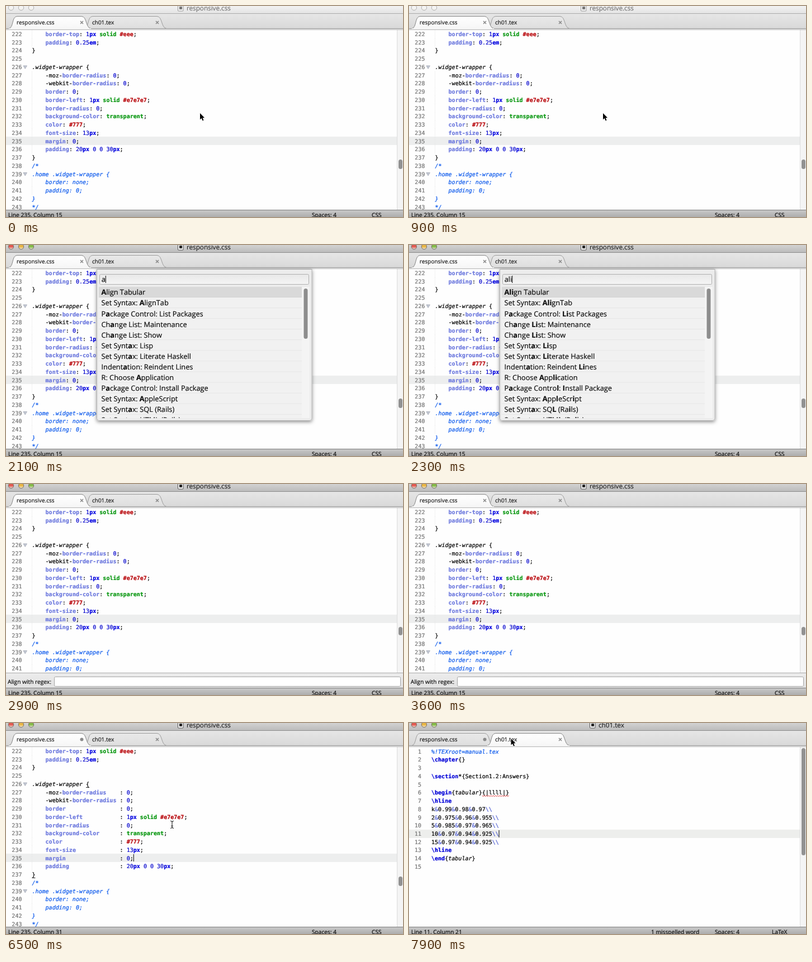
Recreate the animation shown at these times as an HTML page with a canvas. Size 710 by 378 pixels, loop 8000 ms.

```html
<!DOCTYPE html>
<html lang="en">
<head>
<meta charset="utf-8">
<title>Aligning code in an editor</title>
<style>
html, body { margin: 0; width: 100%; height: 100%; overflow: hidden; }
canvas { display: block; width: 710px; height: 378px; }
</style>
</head>
<body>
<canvas></canvas>
<script>
const W = 710, H = 378, LOOP = 8000;
const CW = 6.045, LH = 14.74, LEFT = 46.4;            // code cell and margin
const T = { focus: 1400, palette: 1900, panel: 2900, regex: 4100, align: 4700, mouse: 5600, tab: 7500 };

const canvas = document.querySelector('canvas');
const ctx = canvas.getContext('2d');
const dpr = window.devicePixelRatio || 1;
canvas.width = W * dpr;
canvas.height = H * dpr;
ctx.scale(dpr, dpr);
ctx.textRendering = 'geometricPrecision';

const css = `    border-top: 1px solid #eee;
    padding: 0.25em;
}

.widget-wrapper {
    -moz-border-radius: 0;
    -webkit-border-radius: 0;
    border: 0;
    border-left: 1px solid #e7e7e7;
    border-radius: 0;
    background-color: transparent;
    color: #777;
    font-size: 13px;
    margin: 0;
    padding: 20px 0 0 30px;
}
/*
.home .widget-wrapper {
    border: none;
    padding: 0;
}
*/`.split('\n');

const aligned = css.map((line, i) => {
  if (i < 5 || i > 14) return line;
  const [name, value] = line.split(':');
  return name.padEnd(26) + ':' + value;
});

const tex = String.raw`%!TEXroot=manual.tex
\chapter{}

\section*{Section1.2:Answers}

\begin{tabular}{|llll|}
\hline
k&0.99&0.98&0.97\\
2&0.975&0.96&0.955\\
5&0.985&0.97&0.965\\
10&0.97&0.94&0.925\\
15&0.97&0.94&0.925\\
\hline
\end{tabular}
`.split('\n');

// Letters between stars match the query.
const commands = `*Ali*gn Tabular
Set Syntax: *Ali*gnTab
P*a*ckage Control: *Li*st Packages
Ch*a*nge *Li*st: Maintenance
Ch*a*nge *Li*st: Show
Set Synt*a*x: *Li*sp
Set Synt*a*x: *Li*terate Haskell
Indent*a*tion: Reindent *Li*nes
R: Choose *A*pp*li*cation
P*a*ckage Contro*l*: *I*nstall Package
Set Syntax: *A*pp*l*eScr*i*pt
Set Synt*a*x: SQ*L* (Ra*i*ls)
Set Synt*a*x: HTM*L* (Ra*i*ls)`.split('\n');

const STYLE = {
  plain: ['', '#000'], comment: ['italic', '#0a58ec'], selector: ['italic', '#000'],
  prop: ['bold', '#6d79de'], unit: ['bold', '#0000e0'], num: ['', '#0000cd'],
  word: ['bold', '#06960e'], hex: ['bold', '#b8060b'], key: ['bold', '#0000d8'], op: ['', '#4a5ad0']
};

const CSS_RULES = [
  ['plain', /^(\s+|-(moz|webkit)-|[:;{}])/], ['selector', /^\.[\w-]+/], ['hex', /^#\w+/],
  ['num', /^[\d.]+/], ['unit', /^(px|em)/], ['word', /^(solid|transparent)/], ['prop', /^[\w-]+/]
];
const TEX_RULES = [
  ['comment', /^%.*/], ['key', /^\\[a-z]+/], ['op', /^(&|\\\\)/],
  ['selector', /^tabular/], ['plain', /^([^&\\t]+|t)/]
];

function rect(x, y, w, h, fill) {
  ctx.fillStyle = fill;
  ctx.fillRect(x, y, w, h);
}

function box(x, y, w, h, r, fill, stroke) {
  ctx.beginPath();
  ctx.roundRect(x, y, w, h, r);
  ctx.fillStyle = fill;
  ctx.fill();
  if (stroke) {
    ctx.strokeStyle = stroke;
    ctx.lineWidth = 1;
    ctx.stroke();
  }
}

function dot(x, y, r, fill, stroke) {
  box(x - r, y - r, 2 * r, 2 * r, r, fill, stroke);
}

function fade(y0, y1, ...colors) {
  const g = ctx.createLinearGradient(0, y0, 0, y1);
  colors.forEach((c, i) => g.addColorStop(i / (colors.length - 1), c));
  return g;
}

// A hairline stroke gives the slightly heavy desktop text rendering.
function ink(str, x, y, color) {
  ctx.fillStyle = ctx.strokeStyle = color;
  ctx.lineWidth = .22;
  ctx.fillText(str, x, y);
  ctx.strokeText(str, x, y);
}

function label(str, x, y, size, color = '#111', weight = '') {
  ctx.font = `${weight} ${size}px "Open Sans", "Noto Sans", sans-serif`;
  ink(str, x, y, color);
  return ctx.measureText(str).width;
}

function mono(str, x, y, style) {
  const [face, color] = STYLE[style] || ['', style];
  ctx.font = `${face} 10.04px "DejaVu Sans Mono", "Noto Sans Mono", monospace`;
  ink(str, x, y, color);
}

function code(line, x, y, rules) {
  let rest = line, col = 0;
  while (rest) {
    let style = 'plain', part = rest[0];
    for (const [name, rule] of rules) {
      const m = rest.match(rule);
      if (m) { style = name; part = m[0]; break; }
    }
    mono(part, x + col * CW, y, style);
    col += part.length;
    rest = rest.slice(part.length);
  }
}

function tab(x, name, active, dirty) {
  ctx.beginPath();
  ctx.moveTo(x, 40.5);
  ctx.bezierCurveTo(x + 9, 39, x + 5, 18.5, x + 15, 18.5);
  ctx.lineTo(x + 130, 18.5);
  ctx.bezierCurveTo(x + 140, 18.5, x + 137, 39, x + 147, 40.5);
  ctx.fillStyle = active ? fade(18, 41, '#ffffff', '#f6f6f6') : fade(18, 41, '#e9e9e9', '#dedede');
  ctx.fill();
  ctx.strokeStyle = active ? '#858585' : '#9c9c9c';
  ctx.lineWidth = 1;
  ctx.stroke();
  label(name, x + 14, 33, 10, '#222');
  const cx = x + 130.5, cy = 29.5;
  if (dirty) return dot(cx, cy, 3, '#8b8b8b');
  ctx.beginPath();
  for (const s of [-1, 1]) {
    ctx.moveTo(cx - 2.5, cy - 2.5 * s);
    ctx.lineTo(cx + 2.5, cy + 2.5 * s);
  }
  ctx.strokeStyle = '#8a8a8a';
  ctx.lineWidth = 1.6;
  ctx.stroke();
}

function chrome(t, inTex) {
  const focused = t >= T.focus;
  rect(0, 0, W, 14, focused ? fade(0, 13, '#d2d2d2', '#bcbcbc') : fade(0, 13, '#f2f2f2', '#e4e4e4'));
  rect(0, 13, W, 1, focused ? '#8c8c8c' : '#aaaaaa');
  rect(0, 14, W, 27, fade(14, 41, '#e6e6e6', '#d8d8d8'));

  const lights = focused ? ['#e2574e', '#e8b440', '#82b944'] : ['#f4f4f4', '#f4f4f4', '#f4f4f4'];
  lights.forEach((c, i) => dot(9 + 18 * i, 3, 4.7, fade(-2, 8, c, c, '#f3efe6'), focused ? '#77706a' : '#b0b0b0'));

  const x = inTex ? 323 : 307;
  const color = focused ? '#262626' : '#777';
  box(x + .5, -3, 9.5, 12, 1, '#f4f4f4', focused ? '#555' : '#999');
  rect(x + 3, 1, 5, 5, color);
  label(inTex ? 'ch01.tex' : 'responsive.css', x + 16, 7.5, 11.7, color);

  const dirty = t >= T.align;
  const tabs = [[5, 'responsive.css', !inTex, dirty], [140, 'ch01.tex', inTex, false]];
  tabs.sort((a, b) => a[2] - b[2]).forEach(a => tab(...a));
  const open = inTex ? 140 : 5;
  rect(0, 40, W, 3, '#f4f4f4');
  rect(0, 40, open, 1, '#8f8f8f');
  rect(open + 147, 40, W, 1, '#8f8f8f');
  rect(0, 42, W, 1, '#b5b5b5');
}

function status(left, spell, lang, x) {
  rect(0, 365, W, 13, fade(365, 378, '#cacaca', '#adadad'));
  rect(0, 365, W, 1, '#7d7d7d');
  label(left, 4, 378, 10.2);
  if (spell) label(spell, 433, 378, 10.2);
  label('Spaces: 4', 547, 378, 10.2);
  label(lang, x, 378, 10.2);
}

function scrollbar(y, h) {
  rect(699, 43, 11, 322, '#f4f4f4');
  rect(699, 43, 1, 322, '#dcdcdc');
  box(702, y, 7, h, 3.5, '#929292');
}

function caret(x, y, h = 13) {
  rect(x, y, 1, h, '#000');
}

function gutter(n, right, y) {
  const s = String(n);
  mono(s, right - s.length * CW, y, '#747474');
}

function cssView(t, typing, blink) {
  const done = t >= T.align;
  rect(0, 234, 699, 15, '#edeeee');
  (done ? aligned : css).forEach((line, i) => {
    const y = 54 + i * LH;
    gutter(222 + i, 28.5, y);
    if (i === 4 || i === 17) {
      ctx.beginPath();
      ctx.moveTo(31, y - 6);
      ctx.lineTo(37.5, y - 6);
      ctx.lineTo(34.2, y - .5);
      ctx.closePath();
      ctx.fillStyle = '#c4c9d4';
      ctx.fill();
      ctx.strokeStyle = '#9aa0ac';
      ctx.lineWidth = .7;
      ctx.stroke();
    }
    if (line[0] === ' ')
      for (let d = 0; d < LH; d += 2) rect(46, y - 11 + d, 1, 1, '#e6e6e6');
    if (i > 15) mono(line, LEFT, y, 'comment');
    else code(line, LEFT, y, CSS_RULES);
  });
  if (t >= T.focus && !typing) {
    rect(LEFT + 16 * CW, 115, 6, 1, '#222');
    rect(LEFT, 277, 6, 1, '#222');
    if (blink) caret(LEFT + (done ? 30 : 14) * CW, 235);
  }
  const panel = t >= T.panel && !done;
  scrollbar(panel ? 256 : 275, panel ? 15 : 17);
  status(`Line 235, Column ${done ? 31 : 15}`, '', 'CSS', 654);
}

function texView() {
  rect(0, 191, 699, 15, '#edeeec');
  tex.forEach((line, i) => {
    const y = 54.6 + i * LH;
    gutter(i + 1, 22, y);
    code(line, 40, y, TEX_RULES);
  });
  ctx.beginPath();
  for (let i = 0; i <= 24; i++) ctx.lineTo(40 + 15 * CW + i * 2, 130 + i % 2 * 1.5);
  ctx.strokeStyle = '#e02020';
  ctx.lineWidth = .9;
  ctx.stroke();
  caret(160.5, 192);
  scrollbar(45, 192);
  status('Line 11, Column 21', '1 misspelled word', 'LaTeX', 649);
}

function command(text, x, y, limit) {
  let bold = false, hits = 0;
  for (const ch of text) {
    if (ch === '*') { bold = !bold; continue; }
    const hit = bold && hits++ < limit;
    x += label(ch, x, y, 12.75, '#111', hit ? 'bold' : '');
  }
}

function palette(t, blink) {
  const query = 'ali'.slice(0, Math.max(0, Math.floor((t - 2000) / 100)));
  ctx.save();
  ctx.shadowColor = 'rgba(0,0,0,.45)';
  ctx.shadowBlur = 6 * dpr;
  ctx.shadowOffsetY = 2 * dpr;
  box(162, 43, 385.5, 272, [0, 0, 4, 4], '#ececec');
  ctx.restore();
  box(162.5, 43.5, 384.5, 271, [0, 0, 4, 4], '#ececec', '#b4b4b4');
  box(167.5, 52.5, 374, 18, 2, fade(52, 71, '#e8e8e8', '#f5f5f5'), '#b0b0b0');
  const w = label(query, 170.7, 66, 12.75);
  if (blink) caret(170.7 + w, 55, 13);

  ctx.save();
  ctx.beginPath();
  ctx.rect(166, 75, 377, 235);
  ctx.clip();
  commands.forEach((text, i) => {
    const y = 75 + i * 19.08;
    rect(166, y, 363, 19.08, i ? '#f1f1f1' : '#d9d9d9');
    rect(166, y + 18, 363, 1, i ? '#e5e5e5' : '#d2d2d2');
    command(text, 170.5, y + 14.4, query.length);
  });
  rect(529, 75, 14, 235, '#f4f4f4');
  box(532.5, 78, 7, 90, 3.5, '#8d8d8d');
  ctx.restore();
}

function regexPanel(t, blink) {
  rect(0, 338, W, 27, fade(338, 365, '#ececec', '#e2e2e2'));
  rect(0, 338, W, 1, '#a9a9a9');
  label('Align with regex:', 3, 357.5, 10.2);
  box(86.5, 345.5, 619, 17, 2, '#fff', '#a4a4a4');
  const typed = t >= T.regex ? ':' : '';
  mono(typed, 90, 357.5, 'plain');
  if (blink) caret(90 + typed.length * CW, 348, 12);
}

function glide(t, t0, t1, [x0, y0], [x1, y1]) {
  const p = Math.min(1, Math.max(0, (t - t0) / (t1 - t0)));
  const e = p * p * (3 - 2 * p);
  return [x0 + (x1 - x0) * e, y0 + (y1 - y0) * e];
}

function pointer(t) {
  if (t >= T.palette && t < T.mouse) return;
  const rest = [315, 197], idle = [297, 182];
  const [x, y] = t < T.palette ? glide(t, 900, 1600, [347, 192], rest)
    : t < 6600 ? glide(t, T.mouse, 6300, rest, idle)
    : glide(t, 6600, 7400, idle, [182.5, 28]);
  ctx.save();
  ctx.translate(x, y);
  ctx.beginPath();
  if (t < T.palette || y < 43) {
    [[0, 0], [0, 11.5], [2.6, 9.1], [4.6, 13.6], [6.5, 12.7], [4.6, 8.4], [8, 8.2]].forEach(p => ctx.lineTo(...p));
    ctx.closePath();
    ctx.lineJoin = 'round';
    ctx.lineWidth = 1.6;
    ctx.strokeStyle = '#fff';
    ctx.stroke();
    ctx.fillStyle = '#000';
    ctx.fill();
  } else {
    for (const s of [-1, 1]) {
      ctx.moveTo(-3, 6.5 * s);
      ctx.quadraticCurveTo(0, 6.5 * s, 0, 4 * s);
      ctx.quadraticCurveTo(0, 6.5 * s, 3, 6.5 * s);
    }
    ctx.moveTo(0, -5);
    ctx.lineTo(0, 5);
    ctx.moveTo(-1.8, 2.5);
    ctx.lineTo(1.8, 2.5);
    ctx.lineWidth = 1.1;
    ctx.strokeStyle = '#222';
    ctx.stroke();
  }
  ctx.restore();
}

function draw(t) {
  const inTex = t >= T.tab;
  const inPalette = t >= T.palette && t < T.panel;
  const inPanel = t >= T.panel && t < T.align;
  const blink = t % 1000 < 600;
  rect(0, 0, W, H, '#fefefe');
  if (inTex) texView();
  else cssView(t, inPalette || inPanel, blink);
  chrome(t, inTex);
  if (inPalette) palette(t, blink);
  if (inPanel) regexPanel(t, blink);
  pointer(t);
}

const start = performance.now();
function tick() {
  draw((performance.now() - start) % LOOP);
  requestAnimationFrame(tick);
}
tick();
</script>
</body>
</html>
```
